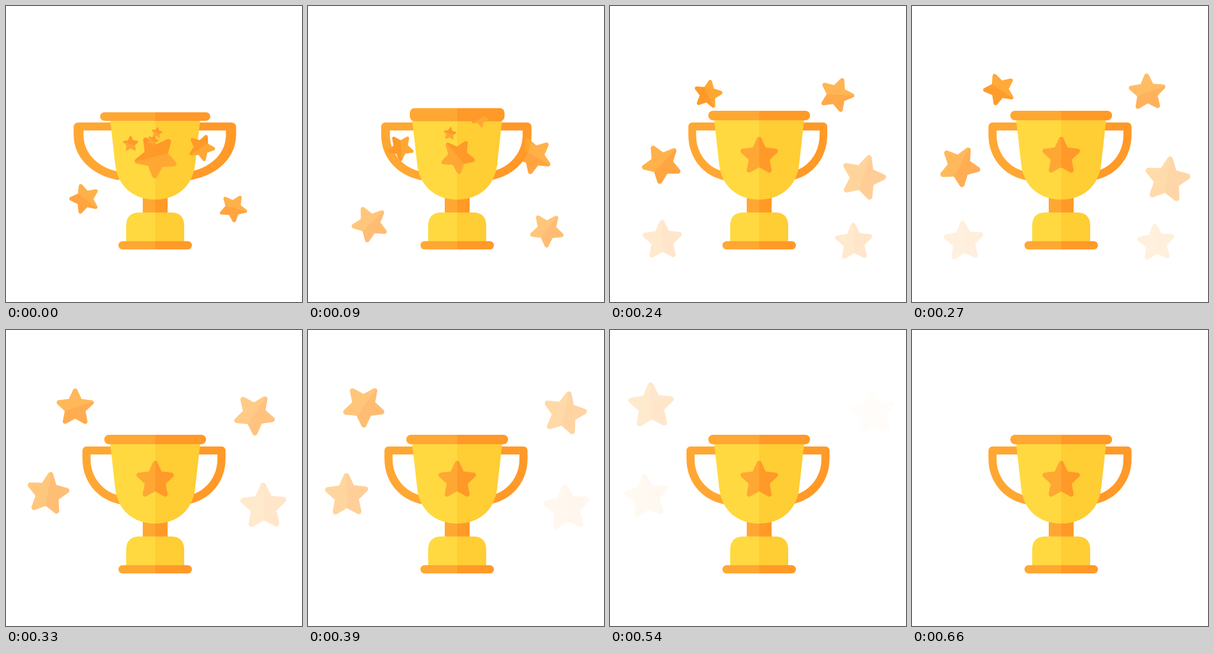
Write an HTML page with a canvas that moves like this. It is 500 by 500 pixels and loops after 1.14 s.

```html
<!DOCTYPE html>
<html lang="en">
<head>
<meta charset="utf-8">
<title>Trophy</title>
<style>
html, body { margin: 0; width: 100%; height: 100%; overflow: hidden; background: #fff; }
canvas { display: block; width: 500px; height: 500px; }
</style>
</head>
<body>
<canvas id="stage" width="500" height="500"></canvas>
<script>
const ctx = document.getElementById('stage').getContext('2d');
const LOOP = 1140, STEP = 30, MID = 252;
const LIGHT = '#ffa733', DARK = '#ff9928';

// Hard two-tone split at x
function split(x, left, right) {
  const g = ctx.createLinearGradient(x - 1, 0, x + 1, 0);
  g.addColorStop(0.5, left);
  g.addColorStop(0.5, right);
  return g;
}
const orange = split(MID, LIGHT, DARK);
const yellow = split(MID, '#ffd93f', '#ffcd34');
const starFill = split(0, LIGHT, DARK);

// Rounded five-pointed star, 33 from the centre to a tip
const STAR_R = 33;
const starPath = new Path2D();
const corner = i => {
  const a = i * Math.PI / 5, r = i % 2 ? 18.6 : 38.5;
  return [r * Math.sin(a), -r * Math.cos(a)];
};
starPath.moveTo(...corner(-1));
for (let i = 0; i < 10; i += 2) {
  starPath.arcTo(...corner(i), ...corner(i + 1), 4);
  starPath.lineTo(...corner(i + 1));
}
starPath.closePath();

const cup = new Path2D('M176 192L184.3 266C188 305 216 327 252 327S316 305 319.7 266L328 192Z');
const foot = new Path2D('M203 399V371Q203 348.7 225.5 348.7H278.5Q301 348.7 301 371V399Z');
const handle = new Path2D('M184 203.5H136V217C136 252 158 280 194 287.5');

// Each star flies from `from` past `bend` to `to`; `age` is its head start in ms
const flyers = [
  { from: [250, 220], bend: [168, 255], to: [86, 400], size: 35, spin: 470, age: 285, end: 330 },
  { from: [233, 162], bend: [378, 302], to: [413, 402], size: 33, spin: 390, age: 285, end: 330 },
  { from: [246, 236], bend: [154, 221], to: [62, 282], size: 38.5, spin: 365, age: 118, end: 565 },
  { from: [250, 278], bend: [344, 190], to: [438, 302], size: 41, spin: 430, age: 190, end: 420 },
  { from: [248, 227], bend: [171, 119], to: [66, 129], size: 40.5, spin: 320, age: -30, end: 630 },
  { from: [252, 216], bend: [349, 144], to: [446, 140], size: 40, spin: 310, age: 30, end: 550 }
];

function star(x, y, size, angle, alpha) {
  ctx.save();
  ctx.globalAlpha = alpha;
  ctx.translate(x, y);
  ctx.rotate(angle * Math.PI / 180);
  ctx.scale(size, size);
  ctx.fillStyle = starFill;
  ctx.fill(starPath);
  ctx.restore();
}

function bar(half, height, y, radius) {
  ctx.beginPath();
  ctx.roundRect(MID - half, y - height / 2, half * 2, height, Math.min(radius, height / 2));
  ctx.fillStyle = orange;
  ctx.fill();
}

function drawHandle(flip, stretch, color) {
  ctx.save();
  if (flip) {
    ctx.translate(500, 0);
    ctx.scale(-1, 1);
  }
  ctx.translate(200, 0);
  ctx.scale(stretch, 1);
  ctx.translate(-200, 0);
  ctx.lineWidth = 13.7;
  ctx.lineJoin = 'round';
  ctx.strokeStyle = color;
  ctx.stroke(handle);
  ctx.restore();
}

function drawCup(t) {
  // Squash of the rim and star, a quick dip that eases back to rest
  const u = Math.min(t / 180, 1);
  const squash = (1 - u) ** 2 * (1 - 8.9 * u);
  // Handles swing in past their rest width, then settle
  const settle = Math.max(0, 1 - (t / 255) ** 4);
  const stretch = 0.21 * Math.cos(Math.PI * t / 240) * settle;
  const angle = -104 * Math.max(0, 1 - t / 240) ** 2;

  drawHandle(false, 1 + stretch, LIGHT);
  drawHandle(true, 1 + stretch * 1.2, DARK);
  bar(21, 32, 336, 0);
  ctx.fillStyle = yellow;
  ctx.fill(foot);
  ctx.fill(cup);
  bar(62, 14, 404.3, 7);
  bar(86 + 7 * squash, 16 - 4.6 * squash + 3.1 * squash ** 2, 185 + 1.7 * squash, 8);
  star(MID - 1.5 * Math.sin(angle * Math.PI / 180), 254, 1 + 0.12 * squash, angle, 1);
}

function drawFlyer({ from, bend, to, size, spin, age, end }, t) {
  const alpha = Math.min(1, (end - t) / 370);
  if (alpha <= 0) return;
  // Remaining share of the flight
  const q = Math.exp(-((Math.max(0, t + age) / 255) ** 2)), p = 1 - q;
  const [x, y] = to.map((end, i) => end * p * p + 2 * bend[i] * p * q + from[i] * q * q);
  star(x, y, (size - 31 * q) / STAR_R, spin * q - 8, alpha);
}

function draw(t) {
  ctx.fillStyle = '#fff';
  ctx.fillRect(0, 0, 500, 500);
  drawCup(t);
  for (const flyer of flyers) drawFlyer(flyer, t);
}

const start = performance.now();
function tick() {
  const t = (performance.now() - start) % LOOP;
  draw(Math.floor(t / STEP) * STEP);
  requestAnimationFrame(tick);
}
tick();
</script>
</body>
</html>
```
